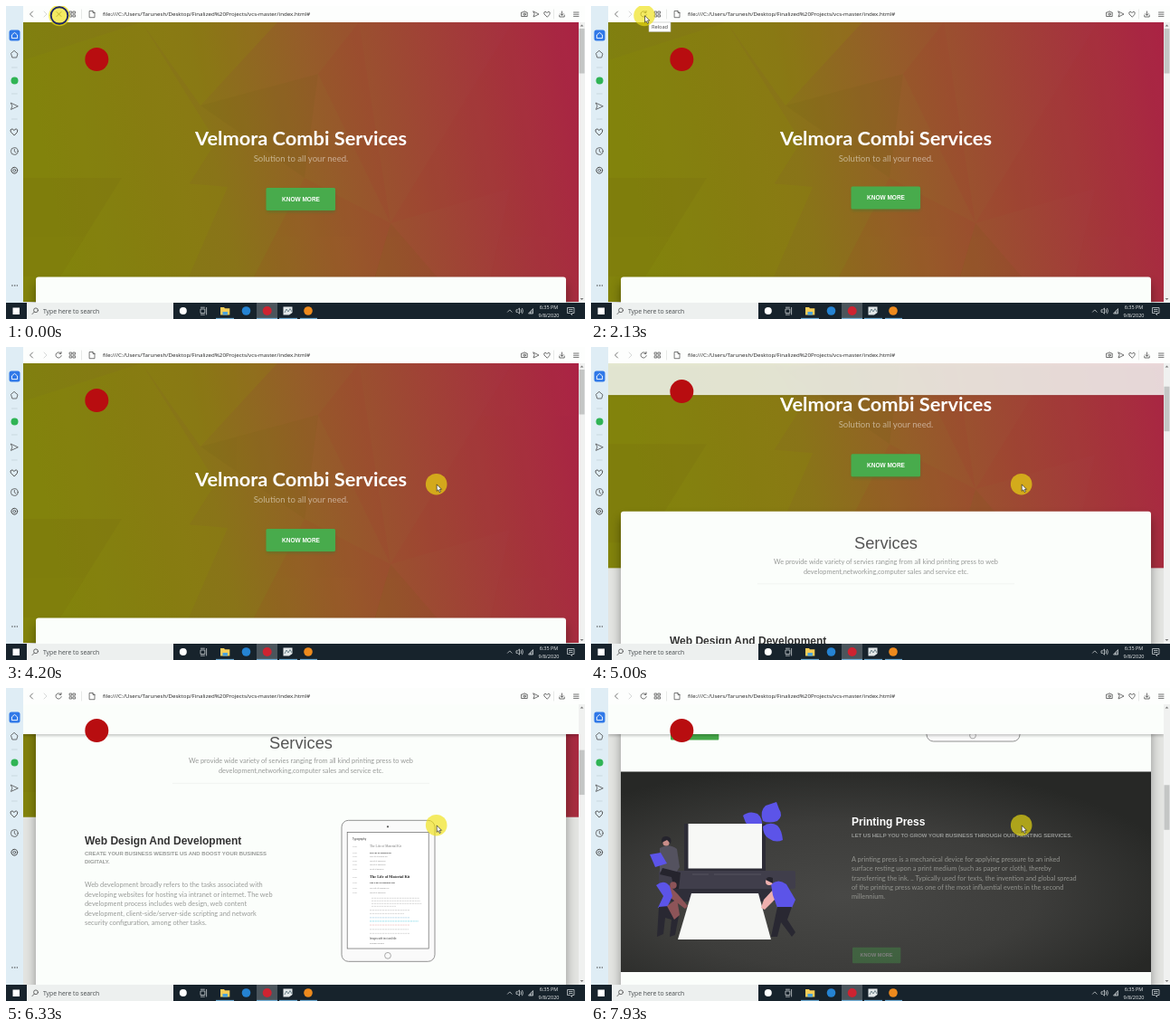
Animation, 640 px wide and 346 px high, one loop 8000 ms. Source, as an HTML page:

```html
<!DOCTYPE html>
<html lang="en">
<head>
<meta charset="utf-8">
<title>Page preview</title>
<style>
  html, body { margin: 0; width: 100%; height: 100%; overflow: hidden; }
  svg { display: block; width: 100vw; height: 100vh; }
  text { font-family: "Liberation Sans", sans-serif; white-space: pre; }
  .lato { font-family: Lato, sans-serif; }
  .ui { font-family: "Open Sans", sans-serif; }
  .bold { font-weight: 700; }
  .mid { text-anchor: middle; }
  .line { fill: none; stroke: #444; stroke-width: .75; stroke-linecap: round; stroke-linejoin: round; }
  .tray { fill: none; stroke: #d5dadc; stroke-width: .75; }
  .copy { font-size: 7.37px; }
  .caps { font-size: 5.95px; font-weight: 700; fill: #979997; }
  .know { font-size: 5.6px; font-weight: 700; fill: #fff; }
  .tiny { font-family: "Liberation Serif", serif; }
</style>
</head>
<body>
<svg viewBox="0 0 640 346" preserveAspectRatio="none">
  <defs>
    <linearGradient id="sky" x1="0" y1=".1" x2="1" y2="0">
      <stop offset="0" stop-color="#80800f"/><stop offset=".3" stop-color="#897418"/>
      <stop offset=".5" stop-color="#955d29"/><stop offset=".72" stop-color="#a04236"/>
      <stop offset="1" stop-color="#ab2147"/>
    </linearGradient>
    <radialGradient id="slate" cx=".42" cy=".62" r=".66">
      <stop offset="0" stop-color="#484846"/><stop offset=".55" stop-color="#3d3d3b"/><stop offset="1" stop-color="#272826"/>
    </radialGradient>
    <filter id="soft" x="-10%" y="-10%" width="120%" height="120%"><feGaussianBlur stdDeviation="6"/></filter>
    <filter id="thin" x="-10%" y="-40%" width="120%" height="180%"><feGaussianBlur stdDeviation="1.6"/></filter>
    <clipPath id="view"><rect x="19" y="18" width="614" height="310"/></clipPath>
  </defs>

  <!-- page -->
  <g clip-path="url(#view)">
    <rect x="19" y="18" width="614" height="310" fill="#e3e4e1"/>
    <g id="hero">
      <rect x="19" y="18" width="614" height="309" fill="url(#sky)"/>
      <g fill="#8f9600" opacity=".16">
        <path d="M19 60L150 18 232 150 120 327H19Z"/>
        <path d="M150 18L215 110 300 18Z"/>
        <path d="M128 190L245 200 190 327H80Z"/>
      </g>
      <g fill="#a83030" opacity=".09">
        <path d="M345 75L425 240 390 18Z"/>
        <path d="M425 240L560 18H633V180Z"/>
        <path d="M260 327L330 190 425 240 400 327Z"/>
        <path d="M530 327L570 140 633 100V327Z"/>
      </g>
      <g fill="#6b5a12" opacity=".1">
        <path d="M215 110L345 75 330 190Z"/>
        <path d="M425 240L500 327H400Z"/>
        <path d="M19 190L128 190 60 299H19Z"/>
      </g>
      <text id="title" class="lato bold mid" x="326" y="153.5" font-size="21.8" fill="#fff">Velmora Combi Services</text>
      <text id="motto" class="lato mid" x="326" y="172" font-size="9.6" fill="#fff" fill-opacity=".5">Solution to all your need.</text>
      <g id="heroButton">
        <rect x="288" y="203" width="76" height="25" rx="2" opacity=".35" filter="url(#thin)" fill="#2b7a30"/>
        <rect x="287.5" y="201" width="76.5" height="25" rx="1.5" fill="#48ab4c"/>
        <text class="know mid" x="326" y="215.8" style="font-size:6.5px">KNOW MORE</text>
      </g>
    </g>

    <g id="content">
      <rect x="33" y="307" width="586" height="900" rx="3" opacity=".36" filter="url(#soft)"/>
      <rect x="33" y="299.5" width="586" height="900" rx="3" fill="#fbfefb"/>

      <g transform="translate(0 221)">
        <text class="mid" x="326" y="120" font-size="18.25" fill="#555">Services</text>
        <g font-size="7.35" fill="#979997">
          <text class="lato mid" x="326" y="136.3">We provide wide variety of servies ranging from all kind printing press to web</text>
          <text class="lato mid" x="326" y="147.6">development,networking,computer sales and service etc.</text>
        </g>
        <path d="M184 158.5H468" stroke="#ecefec" stroke-width=".7"/>
      </g>

      <g transform="translate(0 332)">
        <text class="bold" x="87" y="114.8" font-size="12" fill="#333">Web Design And Development</text>
        <text class="caps" x="87" y="127.6">CREATE YOUR BUSINESS WEBSITE US AND BOOST YOUR BUSINESS</text>
        <text class="caps" x="87" y="136">DIGITALY.</text>
        <g id="webCopy"></g>
        <g id="webButton">
          <rect x="88" y="225.3" width="53.3" height="17.6" rx="1" fill="#45a849"/>
          <text class="know mid" x="114.5" y="236.2">KNOW MORE</text>
        </g>
        <g id="tablet">
          <rect x="371" y="88.5" width="103" height="156" rx="7.5" fill="#fafafa" stroke="#858585" stroke-width=".9"/>
          <circle cx="422" cy="95.5" r="1.1" fill="#555"/>
          <circle cx="422" cy="238" r="3.4" fill="none" stroke="#888" stroke-width=".7"/>
          <rect x="377.2" y="101.8" width="90" height="128.4" fill="#fff" stroke="#666" stroke-width=".7"/>
          <text x="383" y="110" font-size="2.9" fill="#333">Typography</text>
          <g id="samples"></g>
          <g stroke="#aaa" stroke-width=".45" stroke-dasharray="2.2 .6">
            <path d="M404 174.5H457M404 177.5H458M404 180.5H460"/>
            <path d="M404 183.5H431M402 187.8H446M402 191.6H440"/>
            <path d="M402 196H446" stroke="#7ab8d8"/><path d="M402 200H456" stroke="#38c5dc"/>
            <path d="M402 204.2H446" stroke="#e79a9a"/><path d="M402 209H445M402 213.5H446"/>
          </g>
          <text x="402" y="220.5" font-size="2.7" fill="#444">Images with text and title</text>
          <text x="402" y="225" font-size="2.1" fill="#777">Rounded corners</text>
        </g>
      </g>

      <g transform="translate(0 517.5)">
        <rect x="33" y="92.5" width="586" height="221.5" fill="url(#slate)"/>
        <g id="press">
          <path d="M103 150H193V206H103Z" fill="#2d2c36"/>
          <path d="M88 220H212V236H88Z" fill="#2f2e39"/>
          <rect x="75" y="202" width="151" height="20" rx="2" fill="#403e4b"/>
          <path d="M112 206H130M136 206H188" stroke="#55535f" stroke-width="1.2"/>
          <g fill="#5c54e8">
            <path d="M168 141Q175 135 184 139 190 144 189 153 176 154 171 149Z"/>
            <path d="M190 147Q186 136 193 130L205 126 208 134Q213 141 206 147 197 150 190 147Z"/>
            <path d="M190 153Q198 147 206 152 211 157 212 168 204 172 196 166 190 162 190 153Z"/>
          </g>
          <rect x="107.5" y="150" width="81.5" height="49.5" fill="#f7f8f6"/>
          <path d="M111 227H185L199 278H96Z" fill="#f7f8f6"/>
          <!-- seated worker with a laptop -->
          <path d="M76 177Q86 171 95 178L98 198 92 207 76 203Z" fill="#54525f"/>
          <path d="M79 199L99 204 97 222H92L89 209 76 206Z" fill="#25242d"/>
          <circle cx="83" cy="171" r="3.6" fill="#c98d89"/>
          <path d="M78 171Q77 163 84 164 90 165 88 172L84 168Z" fill="#25242d"/>
          <path d="M65 184L77 182 84 194 71 198Z" fill="#5c54e8"/>
          <!-- left worker -->
          <path d="M86 218L96 228 107 241 104 244 88 232Z" fill="#8d5458"/>
          <path d="M72 218Q81 211 87 219L90 230 84 243 74 243 80 230Z" fill="#5c54e8"/>
          <circle cx="91" cy="218" r="3.7" fill="#8d5458"/>
          <path d="M75 242L86 241 97 252 93 273 87 275 89 256 82 254 80 272 73 275Z" fill="#292832"/>
          <path d="M84 241L95 233 98 251 92 256Z" fill="#8d5458"/>
          <!-- right worker -->
          <path d="M202 222L191 234 188 243 192 245 205 232Z" fill="#eeb0ae"/>
          <path d="M199 217Q207 210 216 217L226 234 222 243 206 243 201 229Z" fill="#5c54e8"/>
          <circle cx="197" cy="214" r="4" fill="#eeb0ae"/>
          <path d="M193 212Q195 207 201 210L201 216Z" fill="#25242d"/>
          <path d="M206 242L222 242 217 256 226 270 222 275 210 259 206 275H199Z" fill="#292832"/>
        </g>

        <text class="bold" x="288" y="152" font-size="12" fill="#fff">Printing Press</text>
        <text class="caps" x="288" y="165.3">LET US HELP YOU TO GROW YOUR BUSINESS THROUGH OUR PRINTING SERVICES.</text>
        <g id="printCopy"></g>
        <g id="printButton">
          <rect x="289" y="255.5" width="53.3" height="17.4" rx="1" fill="#45a849"/>
          <text class="know mid" x="315.5" y="266.2">KNOW MORE</text>
        </g>
      </g>
    </g>

    <rect id="navShadow" x="19" y="20" width="614" height="33" filter="url(#thin)"/>
    <rect id="nav" x="19" y="0" width="614" height="51" fill="#fbfefb"/>
    <circle id="badge" cx="100.3" r="13" fill="#b80d10"/>
  </g>

  <!-- scrollbar -->
  <rect x="633" y="18" width="7" height="310" fill="#f0f1f0"/>
  <path d="M634.6 22.4L636.5 20.4 638.4 22.4ZM634.6 323L636.5 325 638.4 323Z" fill="#777"/>
  <rect id="thumb" x="633.5" y="25" width="6" height="49.5" fill="#c4c6c5"/>

  <!-- browser toolbar -->
  <rect x="19" width="621" height="18" fill="#fdfefd"/>
  <g class="line">
    <path d="M29.5 6L26.5 9 29.5 12"/>
    <path d="M42 6L45 9 42 12" stroke="#c9cccb"/>
    <path id="stopIcon" d="M56 6.5L61 11.5M61 6.5L56 11.5"/>
    <path id="reloadIcon" d="M60.6 7A3.1 3.1 0 1 0 61.2 9.6M61 5.4V7.4H59"/>
    <path d="M70.5 6H72.7V8.2H70.5ZM74.3 6H76.5V8.2H74.3ZM70.5 9.8H72.7V12H70.5ZM74.3 9.8H76.5V12H74.3Z" stroke-width=".7"/>
    <path d="M83.5 4V14" stroke="#d8dad9" stroke-width=".6"/>
    <path d="M92.5 5.5H96L98 7.5V12.7H92.5ZM96 5.5V7.5H98" stroke-width=".7"/>
    <path d="M570 7H571.5L572.2 6H574L574.7 7H576.2V11.5H570Z"/><circle cx="573.1" cy="9.1" r="1.2"/>
    <path d="M583 6L589 9 583 12 584 9Z"/>
    <path id="heart" d="M598 12L595 9Q594 6.5 596 6.3 597.4 6.3 598 7.7 598.6 6.3 600 6.3 602 6.5 601 9Z"/>
    <path d="M605.5 4V14" stroke="#d8dad9" stroke-width=".6"/>
    <path d="M614.5 6V10M612.8 8.6L614.5 10.3 616.2 8.6M611.8 10V12H617.2V10"/>
    <path d="M627.5 7H633M627.5 9.2H633M627.5 11.4H633"/>
  </g>
  <text class="ui" x="107" y="11.3" font-size="6.18" fill="#222">file:///C:/Users/Tarunesh/Desktop/Finalized%20Projects/vcs-master/index.html#</text>

  <!-- sidebar -->
  <rect width="19" height="328" fill="#dfedf5"/>
  <rect x="3.5" y="26.5" width="12" height="12" rx="2.5" fill="#2f78e8"/>
  <path d="M6.4 32L9.5 29.4 12.6 32V35.6H6.4Z" fill="none" stroke="#fff" stroke-width=".9"/>
  <circle cx="9.5" cy="82.5" r="4" fill="#30b455"/>
  <g class="line">
    <path d="M9.3 49.6L13 52.8 11.7 57H6.9L5.6 52.8Z"/>
    <path d="M5.5 107.2L13.3 110.8 5.5 114.4 6.8 110.8Z"/>
    <use href="#heart" transform="translate(-708.7 128.4) scale(1.2)"/>
    <circle cx="9.3" cy="160.5" r="3.9"/><path d="M9.3 158.3V160.8L11 162"/>
    <circle cx="9.3" cy="181.7" r="1.4"/><circle cx="9.3" cy="181.7" r="3.4" stroke-dasharray="1.9 .77" stroke-width="1"/>
    <path d="M6.5 68H12.3M6.5 97H12.3M6.5 125H12.3" stroke="#c0cdd4" stroke-width=".7"/>
  </g>
  <path d="M6.2 309H13" stroke="#333" stroke-width="1.2" stroke-dasharray="1.4 1.4"/>

  <!-- taskbar -->
  <rect y="328" width="640" height="18" fill="#17232c"/>
  <rect x="7.5" y="333.5" width="7.5" height="7.5" fill="#fff"/>
  <rect x="23" y="328" width="162" height="18" fill="#edf0ef"/>
  <g class="line"><circle cx="33" cy="336.3" r="2.4"/><path d="M31.2 338.2L29 340.6"/></g>
  <text class="ui" x="41" y="339.7" font-size="6.8" fill="#454a4c">Type here to search</text>
  <circle cx="195.8" cy="337" r="4" fill="#fff"/>
  <path class="tray" d="M215 335H219.8V339.5H215ZM215 333.2H219.8M215 341.2H219.8M221.6 333V341.4"/>
  <path d="M237 333H241L242 334.2H247.3V341.5H237Z" fill="#f4cd58"/><rect x="239.5" y="338" width="5.4" height="3.5" fill="#4aa3dd"/>
  <circle cx="265.5" cy="337" r="4.8" fill="#2583d2"/>
  <rect x="277" y="328" width="23" height="18" fill="#4b555c"/>
  <circle cx="288.7" cy="337" r="5" fill="#ce2331"/>
  <path d="M306.5 332.5H316.5V339L313 341.5H306.5Z" fill="#e3e8e9"/><path d="M308 339L310 335 312 338 314 334.5 316 338" fill="none" stroke="#71868f"/>
  <circle cx="334" cy="337" r="4.8" fill="#ee8a1d"/>
  <path d="M232 345.4H252M277 345.4H300M302 345.4H322M325 345.4H344" stroke="#78b9e4" stroke-width="1"/>
  <g class="tray">
    <path d="M554.2 338.5L556.8 335.9 559.4 338.5"/>
    <path d="M564 335.8H565.6L567.5 334V340.2L565.6 338.4H564ZM569 335.3Q570.2 337 569 339M570.5 334Q572.3 337 570.5 340.2"/>
    <path d="M577.5 340H582.5V334.6ZM579.5 340V338M581 340V336.5"/>
    <path d="M620.5 333.5H628V339.5H625.5V341.5L623.5 339.5H620.5ZM622 335.5H626.5M622 337.5H626.5"/>
  </g>
  <g fill="#eef1f2" font-size="5.5">
    <text class="ui mid" x="600" y="335">6:35 PM</text>
    <text class="ui mid" x="600" y="343.7">9/8/2020</text>
  </g>

  <g id="tooltip">
    <rect x="64" y="18" width="24" height="10.4" fill="#fff" stroke="#b9bab9" stroke-width=".6"/>
    <text class="ui mid" x="76" y="25.4" font-size="5.7" fill="#444">Reload</text>
  </g>
  <g id="pointer">
    <circle r="11.8" fill="#efe010" opacity=".65"/>
    <circle id="ring" r="9.3" fill="none" stroke="#1b2468" stroke-width="1.9"/>
    <path id="arrow" d="M.5 .2V7.6L2.2 6.1 3.4 8.8 4.7 8.2 3.5 5.6H5.8Z" fill="#fff" stroke="#111" stroke-width=".6"/>
  </g>
</svg>
<script>
  const LOOP = 8000;
  const el = Object.fromEntries([...document.querySelectorAll('[id]')].map(node => [node.id, node]));

  // Static repeated text
  const makeLines = (target, x, y, color, lines) => {
    target.innerHTML = lines.map((line, i) =>
      `<text class="lato copy" x="${x}" y="${y + i * 10.4}" fill="${color}">${line}</text>`).join('');
  };
  makeLines(el.webCopy, 87, 162.6, '#979997', [
    'Web development broadly refers to the tasks associated with',
    'developing websites for hosting via intranet or internet. The web',
    'development process includes web design, web content',
    'development, client-side/server-side scripting and network',
    'security configuration, among other tasks.']);
  makeLines(el.printCopy, 288, 191.8, '#93948f', [
    'A printing press is a mechanical device for applying pressure to an inked',
    'surface resting upon a print medium (such as paper or cloth), thereby',
    'transferring the ink. .. Typically used for texts, the invention and global spread',
    'of the printing press was one of the most influential events in the second',
    'millennium.']);
  el.samples.innerHTML = [
    [118.3, 3.6, 400], [124.7, 2.3, 700], [129.6, 2, 400], [134, 1.8, 400], [138.6, 1.8, 400], [143.6, 1.6, 400],
    [152, 4.3, 700], [158.3, 2.7, 700], [163.8, 2.2, 400], [169, 1.8, 400]
  ].map(([y, size, weight]) =>
    `<text class="tiny" x="402" y="${y}" font-size="${size}" font-weight="${weight}" fill="${weight > 400 ? '#222' : '#777'}">The Life of Material Kit</text>
     <text x="383" y="${y}" font-size="1.6" fill="#aaa">Header</text>`).join('');

  // Motion helpers
  const clamp = v => Math.min(1, Math.max(0, v));
  const easeOut = (t, start, length) => 1 - (1 - clamp((t - start) / length)) ** 3;
  const track = (points, t) => {
    const next = points.findIndex(p => p[0] > t);
    if (next === 0) return points[0][1];
    if (next < 0) return points[points.length - 1][1];
    const [t0, v0] = points[next - 1], [t1, v1] = points[next];
    return v0 + (v1 - v0) * (t - t0) / (t1 - t0);
  };
  const move = (node, x, y) => node.setAttribute('transform', `translate(${x} ${y})`);
  const show = (node, amount) => node.setAttribute('opacity', Number(amount));
  const slideIn = (node, p, dx, dy) => {
    move(node, dx * (1 - p), dy * (1 - p));
    show(node, p);
  };

  const SCROLL = [[4220, 0], [4925, 104], [5000, 117.5], [5530, 221], [5600, 221], [5750, 237],
                  [6500, 285], [7050, 332], [7420, 332], [7860, 510], [7920, 517.5]];
  const POINTER_X = [[2500, 59], [2670, 64], [3130, 390], [3330, 390], [3730, 498], [4000, 498], [4170, 475.7]];
  const POINTER_Y = [[2500, 10.5], [2670, 58], [3130, 112], [3330, 112], [3730, 130], [4000, 130], [4170, 151.7]];
  const BOUNCE = [[1150, 36], [1700, -4], [2130, -1.5], [2300, 0]];
  const RELOAD = 350;

  function draw(t) {
    const scroll = track(SCROLL, t);
    move(el.content, 0, -scroll);
    move(el.hero, 0, track(SCROLL, t - 70) / 3 - scroll);
    el.thumb.setAttribute('y', 25 + scroll * .159);

    const reloaded = t >= RELOAD;
    slideIn(el.title, reloaded ? easeOut(t, 950, 600) : 1, 0, 40);
    slideIn(el.motto, reloaded ? easeOut(t, 1050, 600) : 1, 0, 40);
    move(el.heroButton, 0, reloaded ? track(BOUNCE, t) : 0);
    show(el.heroButton, reloaded ? easeOut(t, 1150, 500) : 1);
    slideIn(el.tablet, easeOut(t, 5318, 600), 47, 0);
    slideIn(el.webButton, easeOut(t, 6550, 600), 0, 47);
    slideIn(el.press, easeOut(t, 7480, 450), -47, 0);
    slideIn(el.printButton, easeOut(t, 7855, 600), 0, 47);

    const nav = easeOut(t, 4935, 150);
    const badgeY = 59 - 12 * nav;
    el.badge.setAttribute('cy', badgeY);
    el.nav.setAttribute('height', badgeY + 4);
    show(el.nav, nav);
    show(el.navShadow, nav * .2);

    const pressed = t < 200, loading = t < 1000;
    show(el.stopIcon, loading);
    show(el.reloadIcon, !loading);
    show(el.tooltip, t >= 1900 && t < 2550);
    show(el.ring, pressed);
    show(el.arrow, !pressed);
    move(el.pointer, track(POINTER_X, t), track(POINTER_Y, t));
  }

  const start = performance.now();
  function tick() {
    draw((performance.now() - start) % LOOP);
    requestAnimationFrame(tick);
  }
  tick();
</script>
</body>
</html>
```
